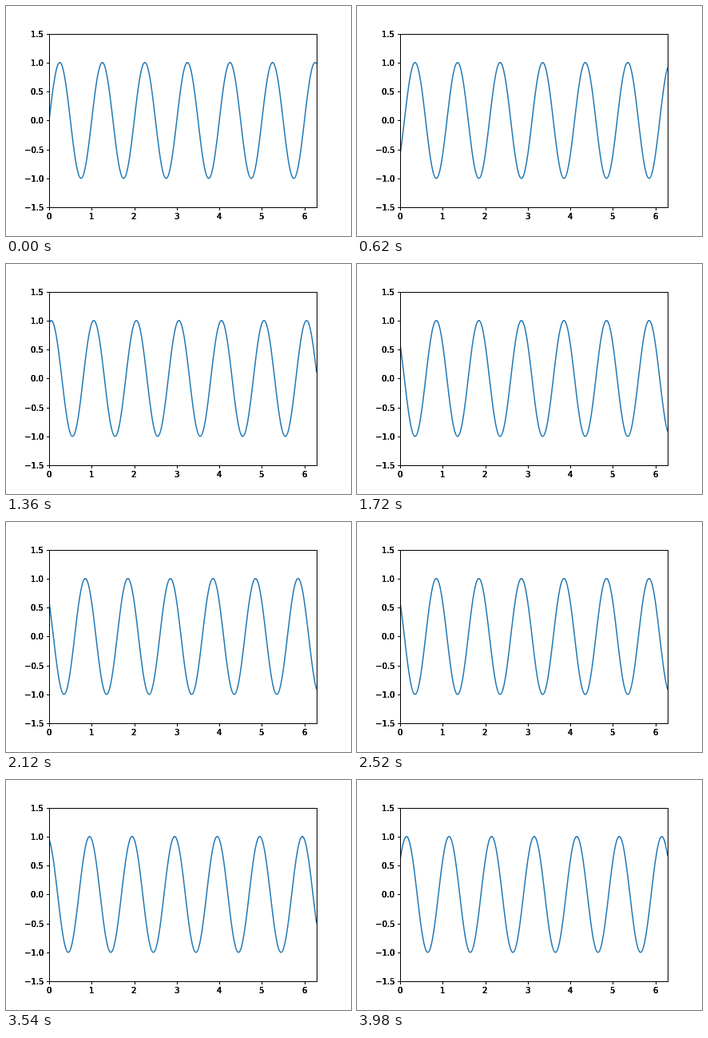
Animation, 432 px wide and 288 px high, one loop 4 s. Source, as an HTML page with a canvas:

```html
<!DOCTYPE html>
<html lang="en">
<head>
<meta charset="utf-8">
<title>Travelling sine wave</title>
<style>
  html, body { margin: 0; width: 432px; height: 288px; overflow: hidden; background: #fff; }
  canvas { display: block; }
</style>
</head>
<body>
<canvas id="plot" width="432" height="288"></canvas>
<script>
const ctx = document.getElementById('plot').getContext('2d');
const TAU = 2 * Math.PI;
const LEFT = 54, RIGHT = 388.8, TOP = 34.56, BOTTOM = 252;
const STEP_MS = 20, STEPS = 200;

const px = x => LEFT + x / TAU * (RIGHT - LEFT);
const py = y => BOTTOM - (y + 1.5) / 3 * (BOTTOM - TOP);

// Repeated passes darken the antialiased glyph edges.
function label(text, x, y) {
  for (let i = 0; i < 4; i++) ctx.fillText(text, Math.round(x), y);
}

function drawCurve(shift) {
  ctx.save();
  ctx.beginPath();
  ctx.rect(LEFT, 35, 335, 217);
  ctx.clip();
  ctx.beginPath();
  for (let i = 0; i <= 1000; i++) {
    const x = TAU * i / 1000;
    ctx.lineTo(px(x), py(Math.sin(TAU * (x - shift))));
  }
  ctx.strokeStyle = '#1f77b4';
  ctx.lineWidth = 1.5;
  ctx.lineJoin = 'round';
  ctx.stroke();
  ctx.restore();
}

function drawAxes() {
  ctx.strokeStyle = ctx.fillStyle = '#000';
  ctx.lineWidth = 1;
  ctx.strokeRect(54.5, 35.5, 335, 217);
  ctx.font = '10px "DejaVu Sans", sans-serif';
  ctx.beginPath();
  for (let n = 0; n <= 6; n++) {
    const x = Math.round(px(n)) + 0.5;
    ctx.moveTo(x, 252.5);
    ctx.lineTo(x, 256);
    label(String(n), px(n) - ctx.measureText(n).width / 2, 267);

    const value = n / 2 - 1.5;
    const y = Math.round(py(value));
    const text = value.toFixed(1).replace('-', '\u2212');
    ctx.moveTo(51, y + 0.5);
    ctx.lineTo(54.5, y + 0.5);
    label(text, 47 - ctx.measureText(text).width, y + 4);
  }
  ctx.stroke();
}

function draw() {
  const step = Math.floor(performance.now() / STEP_MS) % STEPS;
  ctx.fillStyle = '#fff';
  ctx.fillRect(0, 0, 432, 288);
  drawCurve(step % 10 / 10);
  drawAxes();
  requestAnimationFrame(draw);
}
draw();
</script>
</body>
</html>
```
